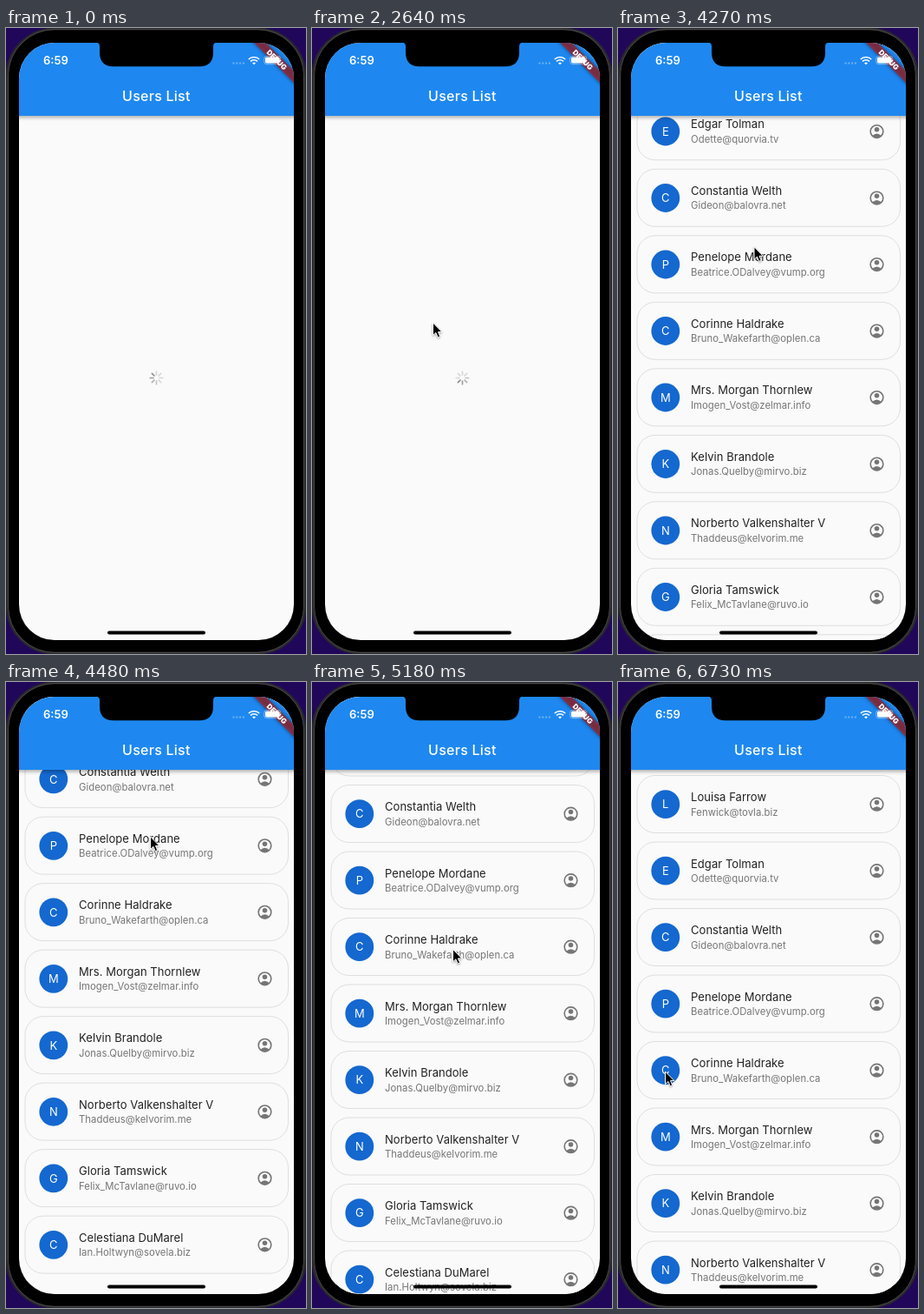
Write an HTML page that moves like this. It is 346 px wide and 720 px high and loops after 6760 ms.

```html
<!DOCTYPE html>
<html lang="en">
<head>
<meta charset="utf-8">
<title>Users List</title>
<style>
  html, body { margin: 0; width: 100%; height: 100%; overflow: hidden; background: #21075a; }
  svg { display: block; width: 346px; height: 720px; font-family: Inter, Roboto, sans-serif; }
  .card { fill: #fafafa; stroke: #dedede; }
  .avatar { fill: #1468cf; }
  .letter { fill: #fff; font-size: 13px; text-anchor: middle; }
  .name { fill: #212121; font-size: 13px; letter-spacing: .05px; }
  .mail { fill: #757575; font-size: 11.3px; letter-spacing: .05px; }
  .icon { fill: #757575; }
  .ring { fill: none; stroke: #757575; stroke-width: 2; }
  .bar { filter: drop-shadow(0 2px 2px rgba(0, 0, 0, .32)); }
</style>
</head>
<body>
<svg viewBox="0 0 346 720">
  <defs>
    <clipPath id="screen"><rect x="15" y="17" width="317" height="687" rx="41"/></clipPath>
  </defs>

  <rect width="346" height="720" fill="#21075a"/>
  <rect x="1" y="1" width="344" height="718" rx="55" fill="#000" stroke="#29292b" stroke-width="3"/>
  <rect x="2.5" y="1.5" width="341" height="717" rx="53.5" fill="none" stroke="#48484a"/>

  <g clip-path="url(#screen)">
    <rect x="15" y="17" width="317" height="687" fill="#fafafa"/>
    <g id="spinner" transform="translate(173.5 402.5)"></g>
    <g id="list"></g>
    <rect class="bar" x="9" y="11" width="329" height="90" fill="#1e88f0"/>
    <text x="173.4" y="83.7" font-size="16" font-weight="500" letter-spacing=".25" fill="#fff" text-anchor="middle">Users List</text>

    <g transform="translate(332 17) rotate(45)">
      <rect x="-50" y="22.8" width="100" height="9.7" fill="#000" opacity=".5" style="filter: blur(2px)"/>
      <rect x="-50" y="22.8" width="100" height="9.7" fill="#b71c1c" opacity=".63"/>
    </g>

    <text x="43" y="42" font-size="13" font-weight="600" fill="#fff">6:59</text>
    <path d="M261.5 40.5H275" stroke="#fff" stroke-width="2" stroke-dasharray="2 1.8" opacity=".35"/>
    <g fill="none" stroke="#fff" stroke-width="1.7">
      <path d="M279.8 36a8.9 8.9 0 0 1 12.4 0M282 38.4a5.7 5.7 0 0 1 8 0"/>
      <path d="M284 40.2q2-1.6 4 0l-2 2z" fill="#fff" stroke="none"/>
    </g>
    <rect x="297.8" y="32.3" width="19" height="9.4" rx="2.8" fill="none" stroke="#fff" opacity=".4"/>
    <rect x="299" y="33.5" width="16.6" height="7" rx="1.7" fill="#fff"/>
    <text transform="translate(332 17) rotate(45)" y="30.7" font-size="8.3" font-weight="900" fill="#fff" text-anchor="middle">DEBUG</text>
    <rect x="117" y="693.4" width="113" height="4.1" rx="2.05"/>
  </g>
  <path d="M104 16.5Q108 17 108 21V28Q108 44.3 124 44.3H223Q239 44.3 239 28V21Q239 17 243 16.5Z"/>

  <path id="cursor" d="M0 0V14.6L3.4 11.5L5.7 16.8L8.2 15.7L6 10.6H10.4Z" stroke="#fff"
    style="filter: drop-shadow(0 1px 1px rgba(0, 0, 0, .35))"/>
</svg>

<script>
const LOOP = 6760, LIST_AT = 3000, PITCH = 76.5;
const $ = id => document.getElementById(id);

const users = [
  ['Louisa Farrow', 'Fenwick@tovla.biz'],
  ['Edgar Tolman', 'Odette@quorvia.tv'],
  ['Constantia Welth', 'Gideon@balovra.net'],
  ['Penelope Mordane', 'Beatrice.ODalvey@vump.org'],
  ['Corinne Haldrake', 'Bruno_Wakefarth@oplen.ca'],
  ['Mrs. Morgan Thornlew', 'Imogen_Vost@zelmar.info'],
  ['Kelvin Brandole', 'Jonas.Quelby@mirvo.biz'],
  ['Norberto Valkenshalter V', 'Thaddeus@kelvorim.me'],
  ['Gloria Tamswick', 'Felix_McTavlane@ruvo.io'],
  ['Celestiana DuMarel', 'Ian.Holtwyn@sovela.biz']
];

$('list').innerHTML = users.map(([name, mail], i) => `
  <g transform="translate(0 ${107.5 + i * PITCH})">
    <rect class="card" x="22" y="0" width="303.5" height="66" rx="21"/>
    <circle class="avatar" cx="54.8" cy="33.2" r="16.4"/>
    <text class="letter" x="54.8" y="37.9">${name[0]}</text>
    <text class="name" x="84" y="29.6">${name}</text>
    <text class="mail" x="84" y="46">${mail}</text>
    <g class="icon" transform="translate(298.5 33.2) scale(.813)">
      <circle class="ring" r="9"/><circle cy="-2.7" r="3.4"/><path d="M-6.6 6.2Q0 -.2 6.6 6.2Q0 11 -6.6 6.2"/>
    </g>
  </g>`).join('');

$('spinner').innerHTML = Array.from({ length: 8 }, (_, i) =>
  `<rect x="-.85" y="-8.1" width="1.7" height="5.4" rx=".85" fill="#3c3c44" transform="rotate(${i * 45})"/>`).join('');
const ticks = [...$('spinner').children];
const tickAlpha = [147, 122, 97, 72, 47, 47, 47, 47];

// Smooth curve through [time, value] points that never overshoots them.
function track(points) {
  const slope = i => (points[i + 1][1] - points[i][1]) / (points[i + 1][0] - points[i][0]);
  const tangent = i => {
    if (i === 0 || i === points.length - 1) return 0;
    const a = slope(i - 1), b = slope(i);
    return a * b > 0 ? 2 * a * b / (a + b) : 0;
  };
  return t => {
    if (t <= points[0][0]) return points[0][1];
    const j = points.findIndex(p => p[0] > t);
    if (j < 0) return points[points.length - 1][1];
    const [t0, v0] = points[j - 1], [t1, v1] = points[j];
    const d = t1 - t0, u = (t - t0) / d, w = 1 - u;
    return v0 * (1 + 2 * u) * w * w + tangent(j - 1) * d * u * w * w
      + v1 * u * u * (3 - 2 * u) - tangent(j) * d * u * u * w;
  };
}

const cursorX = track([[400, -14], [720, 66], [1300, 139.5], [2640, 139.5], [3970, 143],
  [4480, 166.5], [4640, 168], [5000, 165.5], [5180, 162.5], [5580, 126.5], [6600, 54.5]]);
const cursorY = track([[400, 400], [720, 370], [1300, 339], [2640, 339], [3970, 348.5],
  [4480, 178], [4640, 162], [5000, 255], [5180, 307], [5580, 464], [6600, 448]]);
const scroll = track([[4000, 0], [4480, 181.7], [4640, 197], [4820, 193], [5000, 193],
  [5180, 142.3], [5580, -6.2], [5850, 0]]);

function draw(now) {
  const t = now % LOOP, loaded = t >= LIST_AT;
  const head = 7 + Math.floor(8 * (t / 1000 + .11));
  ticks.forEach((tick, i) => tick.setAttribute('opacity', tickAlpha[(head - i) % 8] / 255));
  $('spinner').style.display = loaded ? 'none' : '';
  $('list').style.display = loaded ? '' : 'none';
  $('list').setAttribute('transform', `translate(0 ${-scroll(t)})`);
  $('cursor').setAttribute('transform', `translate(${cursorX(t)} ${cursorY(t)})`);
  requestAnimationFrame(() => draw(performance.now() - start));
}
const start = performance.now();
draw(0);
</script>
</body>
</html>
```
